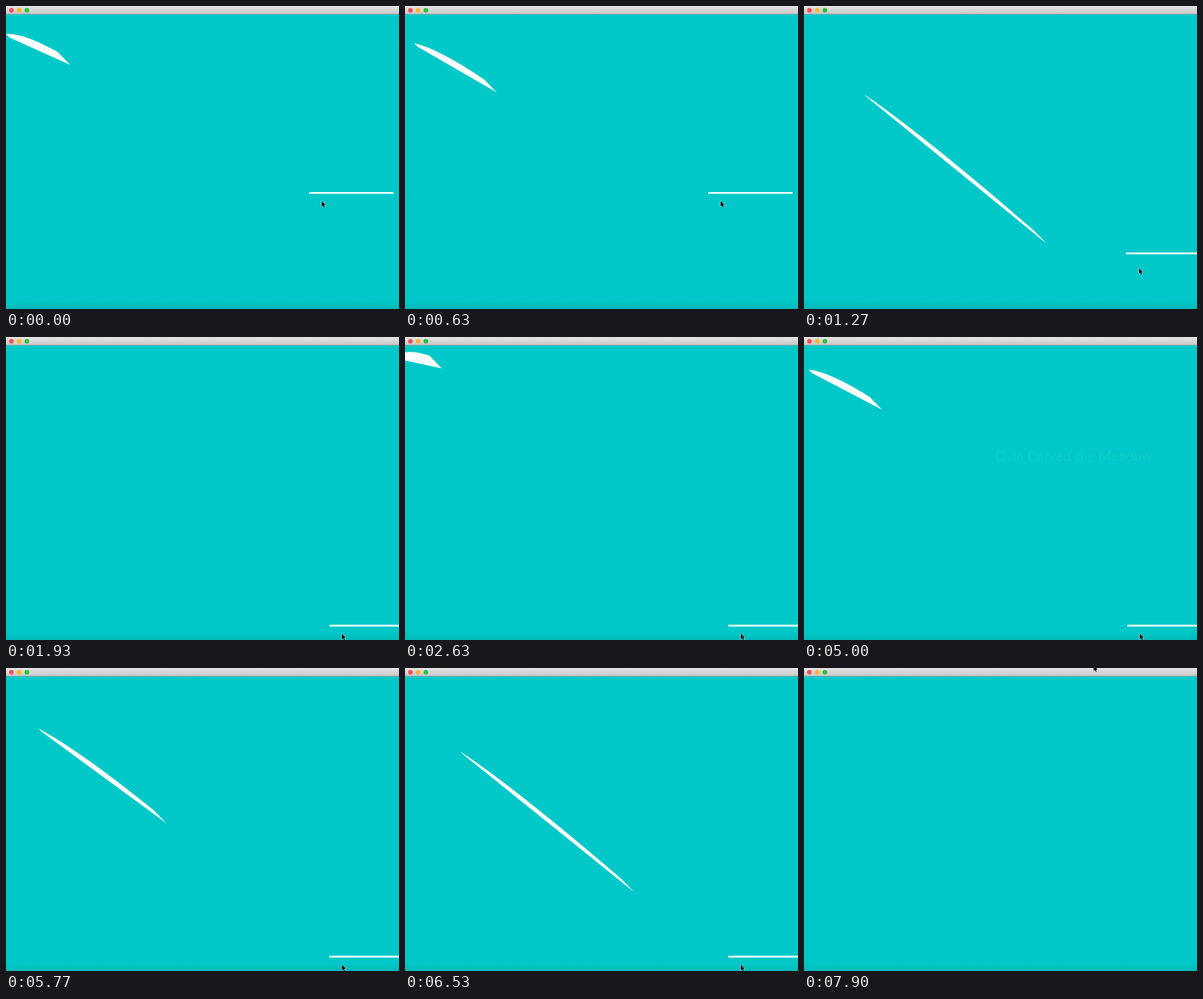
An HTML page with a canvas for the animation above (7.93 s loop, 508 px wide and 391 px high).

```html
<!DOCTYPE html>
<html lang="en">
<head>
<meta charset="utf-8">
<title>Growing blade</title>
<style>
  html, body { margin: 0; width: 100%; height: 100%; overflow: hidden; background: #01c8c8; }
  canvas { display: block; }
</style>
</head>
<body>
<canvas id="stage" width="508" height="391"></canvas>
<script>
const W = 508, H = 391;
const LOOP = 7930, TICK = 100 / 3, TICKS = 238;
const ctx = document.getElementById('stage').getContext('2d');

const clamp = v => Math.min(1, Math.max(0, v));
const progress = (at, from, to) => clamp((at - from) / (to - from));
const easeOut = (u, power) => 1 - (1 - u) ** power;
const mix = (a, b, u) => a + (b - a) * u;

// Glides down, flicks off the top, then sweeps along the title bar
function pointerAt(tick) {
  if (tick >= 224) {
    const u = progress(tick, 224, 237);
    return { x: 427 - 61 * Math.sin(2.1 * u), y: -3.5 };
  }
  const down = progress(tick, 22, 56), up = progress(tick, 203, 213);
  return {
    x: mix(408, 434, easeOut(down, 5)),
    y: mix(251.5, 382.8, easeOut(down, 1.7)) - 450 * up ** 3
  };
}

// The bar trails the pointer by two ticks
function barAt(tick) {
  const { x, y } = pointerAt(tick - 2);
  return { x: x - 16, y: y - 10.3 };
}

const reach = step => 47 + 17.75 * step;

// Two steps per tick, with a brief regular hitch
const stepsBy = tick => 2 * tick - ((tick + 38) % 39 < 10 ? 1 : 0);

// The blade grows step by step and starts over once it meets the bar
function growBlade() {
  const steps = [2];
  let step = 2;
  for (let tick = 1; tick < TICKS; tick++) {
    const limit = barAt(tick).y;
    for (let i = stepsBy(tick - 1); i < stepsBy(tick); i++) {
      step++;
      if (reach(step) > limit) step = -1;
    }
    steps.push(step);
  }
  return steps;
}
const blade = growBlade();

function drawBlade(step) {
  if (step < 0) return;
  const tip = reach(step), tail = 0.338 * tip - 28.2;
  const x0 = tail, y0 = tail + 36.3;
  const x1 = tip - 15.5, y1 = tip - 23;
  ctx.fillStyle = '#fff';
  ctx.beginPath();
  ctx.moveTo(x0, y0);
  ctx.quadraticCurveTo(mix(x0, x1, 0.35), mix(y0, y1, 0.35) - 9.5, x1, y1);
  ctx.lineTo(tip + 0.5, tip - 6.5);
  ctx.lineTo(tail + 5, tail + 41);
  ctx.closePath();
  ctx.fill();
}

function drawCaption(ms) {
  const alpha = 0.52 * Math.sin(Math.PI * progress(ms, 2650, 5100));
  ctx.fillStyle = `rgba(255,255,255,${alpha})`;
  ctx.font = '18.1px Lato, "Open Sans", sans-serif';
  ctx.fillText('Ovia Carved the Meadow', 247, 160);
}

function fade(y0, y1, from, to) {
  const g = ctx.createLinearGradient(0, y0, 0, y1);
  g.addColorStop(0, from);
  g.addColorStop(1, to);
  return g;
}
const metal = fade(0, 10, '#e6e5e6', '#c9c8c9');
const shade = fade(380, H, 'rgba(0,60,60,0)', 'rgba(0,60,60,0.1)');

function drawTitleBar() {
  ctx.fillStyle = metal;
  ctx.fillRect(0, 0, W, 10);
  ctx.fillStyle = '#9ca3a3';
  ctx.fillRect(0, 10, W, 1);
  ['#fb514d', '#fdb52c', '#2cc238'].forEach((color, i) => {
    ctx.fillStyle = color;
    ctx.beginPath();
    ctx.arc(7 + 10 * i, 5.5, 3, 0, 2 * Math.PI);
    ctx.fill();
  });
}

const arrow = new Path2D('M0 0V7.4L1.7 5.8L2.8 8.4L4.1 7.8L3 5.4H5.3Z');

function drawPointer({ x, y }) {
  ctx.save();
  ctx.translate(x, y);
  ctx.strokeStyle = '#fff';
  ctx.lineWidth = 0.9;
  ctx.stroke(arrow);
  ctx.fillStyle = '#000';
  ctx.fill(arrow);
  ctx.restore();
}

function draw(ms) {
  const tick = Math.min(TICKS - 1, Math.floor((ms + 5) / TICK));
  const bar = barAt(tick);
  ctx.fillStyle = '#01c8c8';
  ctx.fillRect(0, 0, W, H);
  ctx.fillStyle = shade;
  ctx.fillRect(0, 380, W, 11);
  drawCaption(tick * TICK);
  drawBlade(blade[tick]);
  ctx.fillStyle = '#fff';
  ctx.fillRect(bar.x, bar.y - 1.1, 109, 2.2);
  drawTitleBar();
  drawPointer(pointerAt(tick));
}

const start = performance.now();
function play() {
  draw((performance.now() - start) % LOOP);
  requestAnimationFrame(play);
}
play();
</script>
</body>
</html>
```
